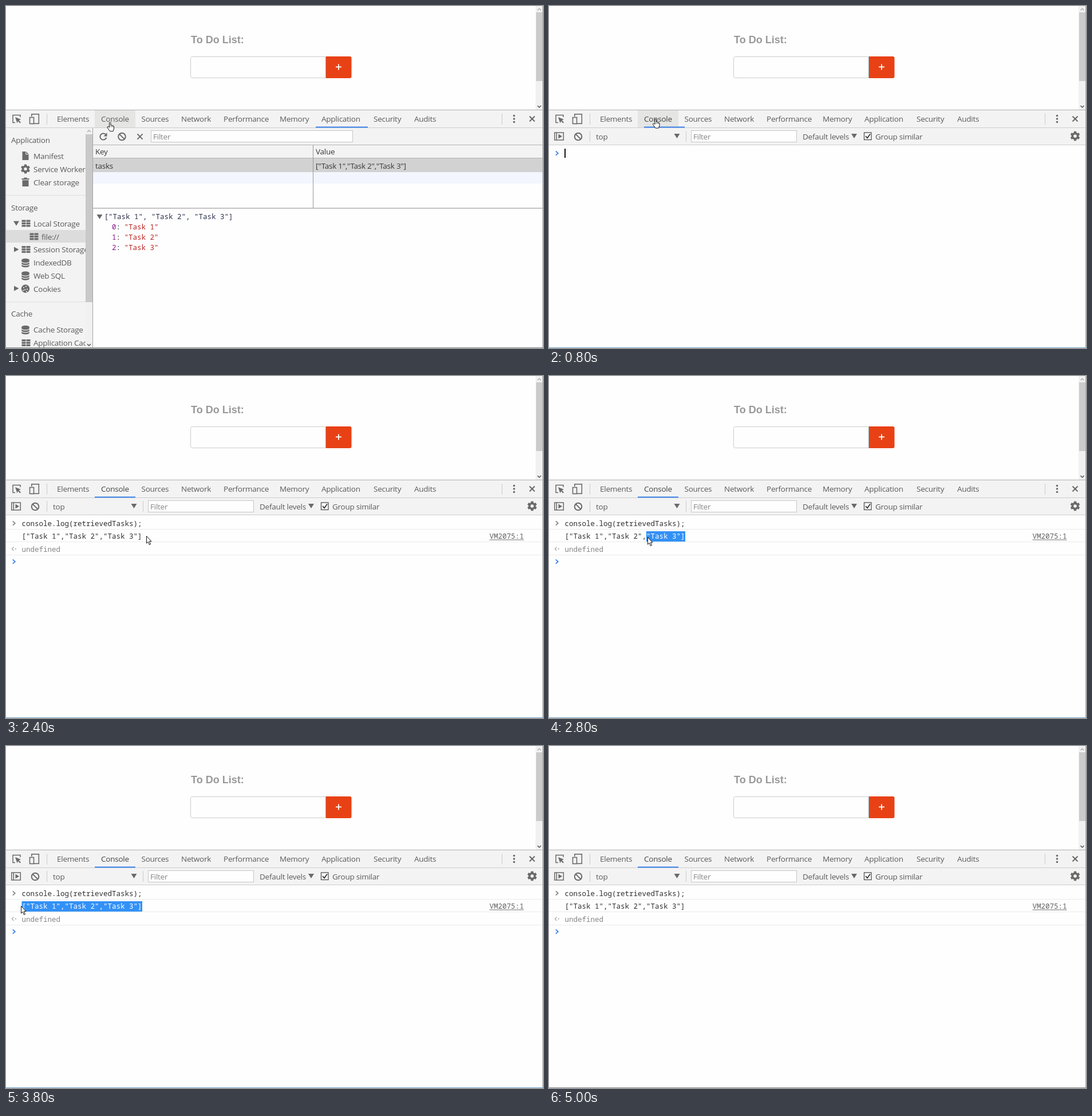
Write an HTML page with a canvas that moves like this. It is 938 by 597 pixels and loops after 5200 ms.

```html
<!DOCTYPE html>
<html lang="en">
<head>
<meta charset="utf-8">
<title>Console demo</title>
<style>
html, body { margin: 0; width: 100%; height: 100%; overflow: hidden; background: #fefefe; }
canvas { display: block; }
</style>
</head>
<body>
<canvas id="stage" width="938" height="597"></canvas>
<script>
const ctx = document.getElementById('stage').getContext('2d');
const LOOP = 5200, STEP = 200;
const UI = '13.5px "Open Sans", "Noto Sans", sans-serif';
const MONO = '12.5px "Noto Sans Mono", "DejaVu Sans Mono", monospace';
const CHAR = 7.5, LEFT = 27.5;
const BAR = '#f3f3f3', ICON = '#6a6a6a', BLUE = '#3b82ea';

// [start ms, kind, x, y]
const POINTER = [
  [0, 'hand', 176.5, 202], [400, 'hand', 176.5, 200.5], [800, 'hand', 181, 196.5],
  [1600, 'hand', 184, 198], [1800, 'arrow', 224, 236], [2000, 'arrow', 241, 278],
  [2200, 'arrow', 245, 283], [2400, 'arrow', 245, 279], [2600, 'arrow', 220, 281],
  [2800, 'arrow', 172, 281], [3000, 'arrow', 51, 282], [3200, 'arrow', 35.5, 281],
  [3400, 'arrow', 30, 281], [3600, 'arrow', 28, 280], [3800, 'arrow', 26, 279],
  [4000, 'arrow', 161, 359], [4200, 'arrow', 166, 361], [4400, 'arrow', 206, 383],
  [4600, 'none', 0, 0]
];
// [start ms, first selected character]
const SELECT = [[0, -1], [2600, 26], [2800, 19], [3000, 2], [3200, 1], [3600, 0], [4200, -1]];

const HAND = new Path2D('M4 10V1.6Q5.2-.2 6.4 1.6V6.2Q8 5.2 8.7 6.7Q10.2 6 10.6 7.4Q12 7 12 8.8V12L10.6 16.6H5L1 11Q-.2 8.6 1.6 8.4Q3 8.8 4 10Z');
const ARROW = new Path2D('M.5.5V13L3.4 10.4L5.4 15.5L7.5 14.6L5.5 9.7H9Z');

const at = (list, t) => list.filter(k => k[0] <= t).pop();

function rect(x, y, w, h, color) {
  ctx.fillStyle = color;
  ctx.fillRect(x, y, w, h);
}

function text(s, x, y, color = '#5a5a5a', font = UI, gap = '-0.25px') {
  ctx.font = font;
  ctx.letterSpacing = gap;
  ctx.fillStyle = color;
  ctx.fillText(s, x, y);
}

const mono = (s, x, y, color = '#303030') => text(s, x, y, color, MONO, '0px');

function poly(points, color) {
  ctx.beginPath();
  for (let i = 0; i < points.length; i += 2) ctx.lineTo(points[i], points[i + 1]);
  ctx.fillStyle = color;
  ctx.fill();
}

function line(points, color = ICON, width = 1.5) {
  ctx.beginPath();
  for (let i = 0; i < points.length; i += 2) ctx.lineTo(points[i], points[i + 1]);
  ctx.strokeStyle = color;
  ctx.lineWidth = width;
  ctx.stroke();
}

function box(x, y, w, h, color, width = 1) {
  ctx.strokeStyle = color;
  ctx.lineWidth = width;
  ctx.strokeRect(x, y, w, h);
}

function disc(x, y, r, color = ICON) {
  ctx.beginPath();
  ctx.arc(x, y, r, 0, 7);
  ctx.fillStyle = color;
  ctx.fill();
}

function ring(x, y, r, width, from = 0, to = Math.PI * 2) {
  ctx.beginPath();
  ctx.arc(x, y, r, from, to);
  ctx.strokeStyle = ICON;
  ctx.lineWidth = width;
  ctx.stroke();
}

const down = (x, y, r = 5) => poly([x - r, y - r + 1, x + r, y - r + 1, x, y + r - 1], ICON);
const right = (x, y) => poly([x - 4, y - 4.5, x + 4.5, y, x - 4, y + 4.5], ICON);

function cross(x, y, r, width = 2) {
  line([x - r, y - r, x + r, y + r], ICON, width);
  line([x + r, y - r, x - r, y + r], ICON, width);
}

function ban(x, y) {
  ring(x, y, 6.3, 2);
  line([x - 4.4, y - 4.4, x + 4.4, y + 4.4], ICON, 2);
}

function gear(x, y, r) {
  for (let i = 0; i < 6; i++) {
    ctx.save();
    ctx.translate(x, y);
    ctx.rotate(i * Math.PI / 3);
    rect(-r * .26, -r, r * .52, r * .6, ICON);
    ctx.restore();
  }
  ring(x, y, r * .56, r * .44);
}

function grid(x, y) {
  for (let r = 0; r < 3; r++)
    for (let c = 0; c < 2; c++) rect(x - 7.5 + c * 8, y - 6 + r * 4.3, 7, 3.3, ICON);
}

function disks(x, y) {
  ctx.fillStyle = ICON;
  ctx.beginPath();
  ctx.ellipse(x, y - 4.5, 6.8, 2.8, 0, 0, 7);
  ctx.fill();
  for (let i = 0; i < 3; i++) {
    const top = y - 4 + i * 4;
    ctx.beginPath();
    ctx.ellipse(x, top + 1.4, 6.8, 2.8, 0, 0, Math.PI);
    ctx.ellipse(x, top - 1, 6.8, 2.6, 0, Math.PI, 0, true);
    ctx.fill();
  }
}

function sheet(x, y) {
  poly([x - 5.5, y - 7.5, x + 1, y - 7.5, x + 5.5, y - 3, x + 5.5, y + 7.5, x - 5.5, y + 7.5], ICON);
  line([x + .8, y - 7, x + .8, y - 2.7, x + 5, y - 2.7], BAR, 1);
}

function trash(x, y) {
  rect(x - 6.5, y - 6.5, 13, 2, ICON);
  rect(x - 2.5, y - 8, 5, 2, ICON);
  rect(x - 5.5, y - 3.5, 11, 11, ICON);
}

function cookie(x, y) {
  disc(x, y, 7.2);
  [[-3, -2], [1, -4], [3, 1], [-1, 2], [-4, 3], [2, 5]].forEach(([dx, dy]) => disc(x + dx, y + dy, 1.1, BAR));
}

function page() {
  rect(0, 0, 938, 597, '#fefefe');
  text('To Do List:', 323, 65, '#999', 'bold 18px "Liberation Sans", Arial, sans-serif', '0px');
  ctx.beginPath();
  ctx.roundRect(322.5, 88.5, 240, 37, 3);
  ctx.strokeStyle = '#ccc';
  ctx.lineWidth = 1;
  ctx.stroke();
  ctx.beginPath();
  ctx.roundRect(559, 88, 44.5, 38, [0, 3, 3, 0]);
  ctx.fillStyle = '#e84115';
  ctx.fill();
  rect(558, 89, 1, 36, '#8fabb5');
  rect(576, 105.5, 10, 1.8, '#fff');
  rect(580, 101.5, 1.8, 10, '#fff');
  rect(925, 0, 12, 181, '#f1f1f1');
  rect(926, 11, 11, 120, '#cbcbcb');
  line([928.5, 7.5, 931.5, 4.5, 934.5, 7.5], '#aaa', 1.3);
  line([928.5, 174, 931.5, 177, 934.5, 174], '#555', 1.5);
}

function tabs(hover, x, w) {
  rect(0, 181, 938, 1, '#b0b0b0');
  rect(0, 182, 938, 30, BAR);
  rect(0, 212, 938, 1, '#cdcdcd');
  if (hover) rect(155, 182, 71, 30, '#e5e5e3');
  rect(x, 210.5, w, 2, BLUE);

  line([16, 203.5, 12, 203.5, 12, 190.5, 25, 190.5, 25, 194]);
  poly([16, 194, 26, 198, 22.5, 199.5, 26, 203, 24.5, 204.5, 21, 201, 19.5, 204.5], ICON);
  box(44.8, 188.8, 12.5, 16.5, ICON, 1.6);
  rect(40, 193, 9, 13, BAR);
  box(41.5, 194.5, 7, 11, ICON, 1.6);
  rect(71, 188, 1, 19, '#ccc');

  const names = [['Elements', 89], ['Console', 166], ['Sources', 236.5], ['Network', 306],
    ['Performance', 380], ['Memory', 478], ['Application', 551], ['Security', 642], ['Audits', 713]];
  for (const [name, left] of names) text(name, left, 202, name === 'Console' && x < 200 ? '#444' : '#5a5a5a');

  rect(866, 188, 1, 19, '#ccc');
  for (const y of [191.5, 197, 202.5]) disc(887.5, y, 1.8);
  cross(919, 197, 4.5);
}

function field(x, w) {
  rect(x, 217, w, 21, '#fefefe');
  box(x + .5, 217.5, w - 1, 20, '#c6c6c6');
  text('Filter', x + 4, 233, '#858585');
}

function sidebar() {
  rect(0, 213, 151, 384, BAR);
  rect(0, 391, 139, 22, '#dcdcdc');
  rect(0, 330, 139, 1, '#dedede');
  rect(0, 516, 139, 1, '#dedede');

  ctx.save();
  ctx.beginPath();
  ctx.rect(0, 213, 139, 384);
  ctx.clip();
  text('Application', 9, 239);
  text('Storage', 9, 357);
  text('Cache', 9, 542);
  const items = [
    [sheet, 'Manifest', 261.5], [(x, y) => gear(x, y, 8), 'Service Workers', 284.5], [trash, 'Clear storage', 307.5],
    [grid, 'Local Storage', 379.5], [grid, 'file://', 402.5, 14], [grid, 'Session Storage', 425],
    [disks, 'IndexedDB', 448], [disks, 'Web SQL', 470.5], [cookie, 'Cookies', 493.5],
    [disks, 'Cache Storage', 565], [grid, 'Application Cache', 588]
  ];
  for (const [icon, label, y, indent = 0] of items) {
    icon((icon === grid ? 35 : 34) + indent, y);
    text(label, 48 + indent, y + 5);
  }
  down(18, 379.5);
  right(18, 425);
  right(18, 493);
  ctx.restore();

  rect(139, 213, 12, 384, '#f1f1f1');
  rect(139, 224, 12, 293, '#c9c9c9');
  line([142, 220, 145, 217, 148, 220], '#aaa', 1.3);
  line([142, 590, 145, 593, 148, 590], '#555', 1.5);
  rect(151, 213, 1, 384, '#a3a3a3');
}

function storage() {
  tabs(true, 541, 91);
  sidebar();
  rect(152, 213, 786, 52, BAR);
  rect(152, 242, 786, 1, '#b4b4b4');
  rect(152, 265, 786, 1, '#b4b4b4');
  rect(152, 266, 786, 24, '#d2d2d2');
  rect(152, 290, 786, 20, '#f3f6fe');
  rect(536, 243, 1, 110, '#989898');
  rect(152, 352.5, 786, 1, '#8c8c8c');

  ring(170, 228, 5.6, 2, .3, 5.5);
  poly([176.5, 221, 176.5, 227.5, 170.5, 227.5], ICON);
  ban(202.5, 228);
  cross(234, 228, 4.6);
  field(253, 353);

  const dark = '#383838';
  text('Key', 156, 259, dark);
  text('Value', 541, 259, dark);
  text('tasks', 156, 283.5, dark);
  text('["Task 1","Task 2","Task 3"]', 541, 283.5, dark);

  down(163.5, 368);
  mono('["Task 1", "Task 2", "Task 3"]', 171.5, 372, '#29304a');
  for (let i = 0; i < 3; i++) {
    const y = 390 + i * 18.2;
    mono(i + '', 185, y, '#881391');
    mono(':', 185 + CHAR, y);
    mono(`"Task ${i + 1}"`, 185 + 3 * CHAR - 1, y, '#bd241f');
  }
}

function prompt(y, color) {
  line([11.8, y - 3.7, 15.8, y, 11.8, y + 3.7], color, 1.8);
}

function toolbar() {
  rect(0, 213, 938, 29, BAR);
  rect(0, 242, 938, 1, '#cdcdcd');
  box(9.8, 221, 15.5, 13, ICON, 1.5);
  rect(12.5, 221, 1.5, 13, ICON);
  poly([16.5, 223.5, 23, 227.5, 16.5, 231.5], ICON);
  ban(51, 228);
  rect(71, 218, 1, 19, '#ccc');
  text('top', 82, 232.5);
  down(223.5, 227);
  rect(239, 218, 1, 19, '#ccc');
  field(248, 185);
  text('Default levels', 443, 232.5);
  down(533, 227);
  rect(550, 221, 14, 13, '#fefefe');
  box(550.5, 221, 12.5, 12.5, '#444', 1.2);
  line([553, 227, 556, 230.5, 561, 223.5], '#333', 1.8);
  text('Group similar', 570, 232.5);
  gear(919, 227, 8.3);
}

function output(t) {
  const log = '["Task 1","Task 2","Task 3"]';
  prompt(257, '#888');
  mono('console.log(retrievedTasks);', LEFT, 262);
  for (const y of [267, 289, 312]) rect(0, y, 937, 1, '#ebebeb');
  mono(log, LEFT, 284);

  const first = at(SELECT, t)[1];
  if (first >= 0) {
    const x = LEFT + first * CHAR;
    rect(x, 271, 238 - x, 18, '#3391f6');
    mono(log.slice(first), x, 284, '#fff');
  }

  mono('VM2075:1', 844.5, 284, '#606060');
  rect(844.5, 285.5, 60, 1, '#707070');
  line([13.5, 298.5, 10.5, 301.7, 13.5, 305], '#aaa', 1.3);
  disc(16.8, 301.7, 1.1, '#aaa');
  mono('undefined', LEFT, 306.5, '#858585');
  prompt(324, BLUE);
}

function consoleTab(t) {
  tabs(t < 1800, t < 1000 ? 166 : 155, 71);
  toolbar();
  if (t < 1400) prompt(257, BLUE);
  else output(t);
  if (t < 1200) rect(27, 249, 2, 16, '#111');
  if (t >= 4200 && t < 4800) rect(27, 316, 2, 16, '#111');
}

function pointer(t) {
  const [, kind, x, y] = at(POINTER, t);
  if (kind === 'none') return;
  const shape = kind === 'hand' ? HAND : ARROW;
  ctx.save();
  ctx.translate(x, y);
  ctx.fillStyle = '#fff';
  ctx.strokeStyle = '#111';
  ctx.lineWidth = 1;
  ctx.fill(shape);
  ctx.stroke(shape);
  if (kind === 'hand') for (const k of [6.4, 8.6, 10.5]) line([k, 7, k, 9.5], '#333', .7);
  ctx.restore();
}

function draw(now) {
  const t = Math.floor(now % LOOP / STEP) * STEP;
  page();
  if (t < 800) storage();
  else consoleTab(t);
  rect(937, 0, 1, 597, '#a5a9ad');
  rect(0, 596, 938, 1, t >= 400 && t < 5000 ? '#6fa2c8' : '#858585');
  pointer(t);
}

const start = performance.now();
function tick() {
  draw(performance.now() - start);
  requestAnimationFrame(tick);
}
tick();
</script>
</body>
</html>
```
